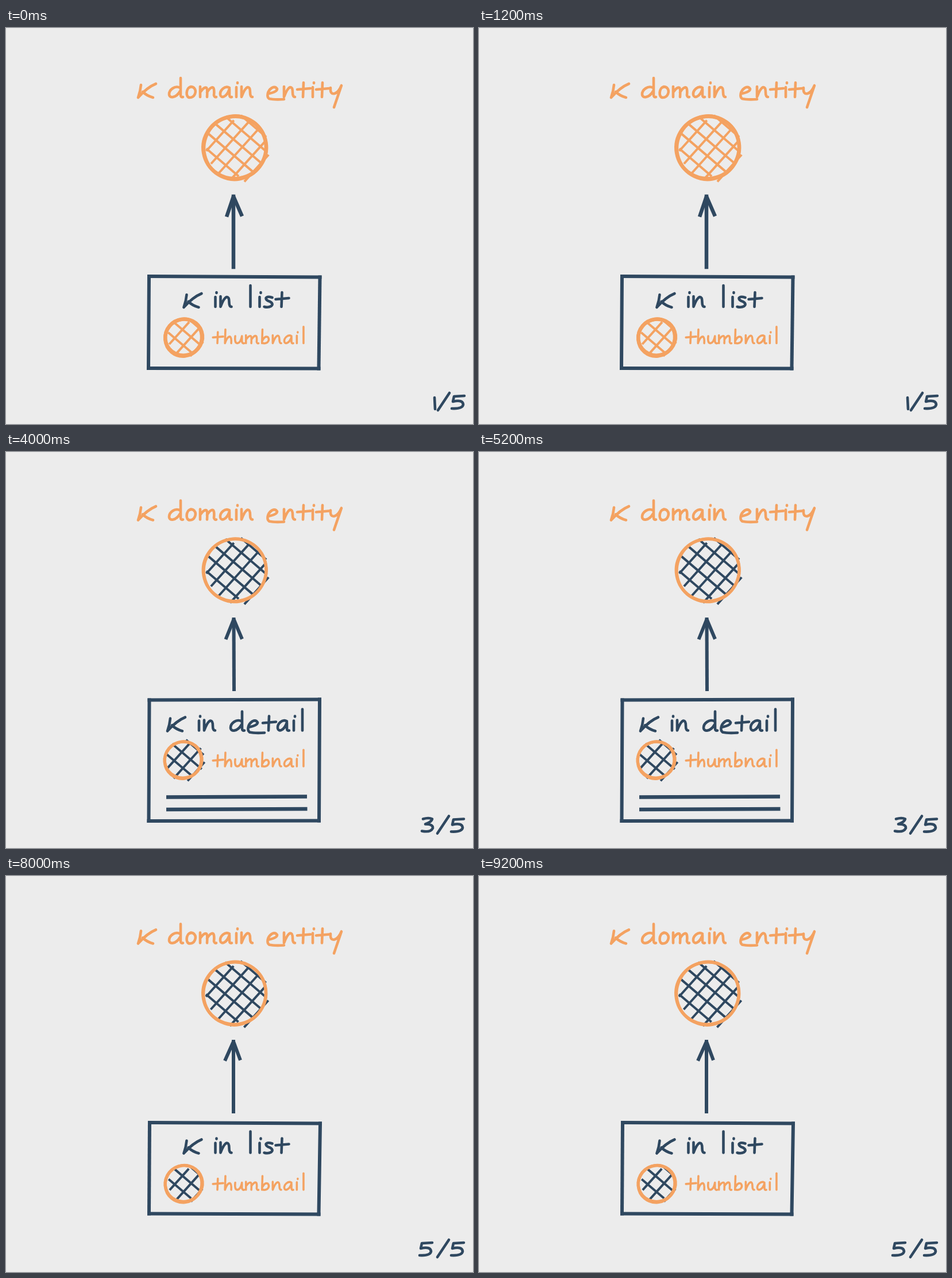
An HTML page with a canvas that plays this animation: 813 px wide and 689 px high, repeating every 10000 ms.

```html
<!DOCTYPE html>
<html lang="en">
<head>
<meta charset="utf-8">
<title>K domain entity</title>
<style>
html, body { margin: 0; width: 100%; height: 100%; overflow: hidden; background: #ececec; }
canvas { display: block; }
</style>
</head>
<body>
<canvas id="stage" width="813" height="689" role="img"></canvas>
<script>
const stage = document.getElementById('stage');
const ctx = stage.getContext('2d');
const ORANGE = '#f4a261', NAVY = '#2f4860', PAPER = '#ececec';
const SMALL = 0.777;

// Handwritten letters: [advance, pen strokes], baseline at y = 0
const glyphs = {
  ' ': [20, ''],
  K: [36, 'M9-21Q8-10 4 1M35-23Q20-17 4 1M12-9Q19-2 30 1'],
  a: [27, 'M18-16C10-21 1-11 2-4C3 3 13 1 18-14L18-4Q18 1 22 0'],
  b: [25, 'M4-31L3 0M4-6Q9-17 16-14Q21-8 15-2Q9 2 3-1'],
  c: [27, 'M18-16Q9-19 4-10Q1 1 9 1Q15 0 20-4'],
  d: [31, 'M21-16C12-21 2-12 2-5C2 3 14 2 21-10M22-33L22-4Q22 1 26 0'],
  e: [28, 'M4-6Q18-9 18-14Q15-19 9-16C0-10 0 0 4 3Q12 5 30 4'],
  g: [28, 'M18-15C8-20 1-8 4-3Q10 2 18-14L16 6Q13 18 4 14'],
  h: [24, 'M4-31L3 0Q8-15 14-15Q18-13 17 0'],
  i: [10, 'M3-17L3 0M5-25L5-24'],
  k: [34, 'M5-31L3 0M34-23Q18-15 6-8Q18-4 29 0'],
  l: [21, 'M8-37L8 0'],
  m: [35, 'M2-18L2 0M2-8Q9-18 13-16Q15-14 14 0M14-8Q21-19 25-16Q27-13 26-3Q27 1 30 0'],
  n: [26, 'M2-18L2 0Q8-16 13-17Q17-17 17-8Q17 0 21 0'],
  o: [23, 'M9-18C0-16-1 1 7 1C16 1 19-10 15-15Q12-19 7-17'],
  p: [20, 'M4-15L2 14M4-10Q10-19 15-14Q19-5 10-1Q6 0 3-3'],
  s: [22, 'M15-16Q6-19 4-15Q4-11 11-9Q18-5 13-1Q8 2 1 0'],
  t: [23, 'M10-25L9 0M-1-13L22-15'],
  u: [24, 'M2-16Q0 0 7 0Q14-1 17-16L17-4Q18 1 22 0'],
  y: [23, 'M1-16Q0-4 8-6Q15-8 20-20L7 18'],
  1: [8, 'M3-19L4 1'],
  2: [29, 'M4-17Q7-24 14-22Q17-17 11-10Q5-1 2-3Q3-9 10-3Q15 1 26 1'],
  3: [28, 'M4-22Q14-25 20-22Q19-17 8-13Q22-13 21-6Q17 2 2-1'],
  4: [24, 'M10-21L2-7Q12-6 20-8M18-20L14 1'],
  5: [31, 'M23-22L5-21L3-12Q20-16 21-7Q20 1 1 0'],
  '/': [24, 'M21-27L1 3']
};
for (const g of Object.values(glyphs)) g[1] = new Path2D(g[1]);

function write(text, x, y, color, size = 1, angle = 0) {
  ctx.save();
  ctx.translate(x, y);
  ctx.rotate(angle);
  ctx.scale(size, size);
  ctx.strokeStyle = color;
  ctx.lineWidth = 4.6;
  ctx.lineCap = ctx.lineJoin = 'round';
  for (const ch of text) {
    const [advance, path] = glyphs[ch];
    ctx.stroke(path);
    ctx.translate(advance, 0);
  }
  ctx.restore();
}

function line(x1, y1, x2, y2, color, width, cap = 'butt') {
  ctx.strokeStyle = color;
  ctx.lineWidth = width;
  ctx.lineCap = cap;
  ctx.beginPath();
  ctx.moveTo(x1, y1);
  ctx.lineTo(x2, y2);
  ctx.stroke();
}

let seed;
function jitter(amount) {
  seed = (seed * 16807) % 2147483647;
  return (seed / 2147483647 * 2 - 1) * amount;
}

function hatch(x, y, radius, angle, offsets, lean, color) {
  const c = Math.cos(angle), s = Math.sin(angle);
  for (const d of offsets) {
    const half = Math.sqrt(Math.max(0, (radius + d * lean) ** 2 - d * d));
    const a = -half + jitter(2), b = half + jitter(2);
    const px = x - s * d, py = y + c * d;
    line(px + c * a, py + s * a, px + c * b, py + s * b, color, 4);
  }
}

function disc(x, y, r, inner, rising, falling, color, width) {
  const deg = Math.PI / 180;
  hatch(x, y, inner, -48 * deg, rising, 0.14, color);
  hatch(x, y, inner, 40.5 * deg, falling, -0.09, color);
  ctx.strokeStyle = ORANGE;
  ctx.lineWidth = width;
  for (let pass = 0; pass < 2; pass++) {
    ctx.beginPath();
    ctx.ellipse(x + jitter(0.6), y + jitter(0.6), r + 0.5, r - 0.5, jitter(1.5), 0, 7);
    ctx.stroke();
  }
}

function arrow(x1, y1, x2, y2, wings, color, width) {
  line(x1, y1, x2, y2, color, width, 'square');
  ctx.lineJoin = 'round';
  ctx.lineCap = 'butt';
  ctx.beginPath();
  ctx.moveTo(wings[0], wings[1]);
  ctx.lineTo(x2, y2);
  ctx.lineTo(wings[2], wings[3]);
  ctx.stroke();
}

function box(p) {
  for (let i = 0; i < 8; i += 2)
    line(p[i], p[i + 1], p[(i + 2) % 8], p[(i + 3) % 8], NAVY, 6, 'square');
}

function tap() {
  write('tap', 557, 410, ORANGE, 0.75, -0.49);
  line(594.5, 333, 592, 360, ORANGE, 6);
  line(618, 341, 609.5, 358, ORANGE, 6);
  line(638.5, 360.5, 616, 368.5, ORANGE, 6);
}

function rules(y1, y2, y3, y4) {
  line(279, y1, 524, y2, NAVY, 6.7);
  line(279, y3, 524.5, y4, NAVY, 6.3);
}

function goBack() {
  arrow(272, 333.5, 190, 332.5, [226, 320, 225, 345.5], ORANGE, 6);
  write('go back', 164, 387.5, ORANGE, SMALL);
}

const steps = [
  { x: 226, y: 120, ring: [398, 208.5], ringW: 6.3, fill: ORANGE, inner: 31, thumb: [309.5, 538.5],
    shaft: [396, 416, 396, 293], wings: [384, 328.5, 411, 327.5], shaftW: 6.5,
    frame: [249, 432, 546.5, 433.5, 544.5, 592.5, 248, 592], label: 'K in list', labelX: 305.5, labelY: 485,
    noteY: 548.5, page: [743, 662] },
  { x: 227, y: 117, ring: [398, 206], ringW: 5.8, fill: ORANGE, inner: 30, thumb: [310, 536.5],
    shaft: [398, 411, 398, 289], wings: [386, 323.5, 413, 322.5], shaftW: 7.2,
    frame: [251, 430, 547, 429.5, 546.5, 589.5, 251, 588.5], label: 'K in list', labelX: 306.5, labelY: 483,
    noteY: 546.5, page: [721, 660], extra: tap },
  { x: 226, y: 117.5, ring: [398, 206], ringW: 5.2, fill: NAVY, inner: 34, thumb: [308.5, 536],
    shaft: [397, 413, 396.5, 291], wings: [382.5, 326, 411, 325.5], shaftW: 6,
    frame: [249.5, 431.5, 546, 430.5, 545, 641.5, 248.5, 642], label: 'K in detail', labelX: 277, labelY: 484.5,
    noteY: 547, page: [722, 660.5], extra: () => rules(600.5, 599.5, 622, 621) },
  { x: 227, y: 116.5, ring: [398.5, 205], ringW: 5.2, fill: NAVY, inner: 30, thumb: [310, 535.5],
    shaft: [398, 411, 398, 289], wings: [384, 324, 411, 324], shaftW: 6.5,
    frame: [251, 429, 547, 430, 546, 640, 251, 639.5], label: 'K in detail', labelX: 277.5, labelY: 483.5,
    noteY: 546.5, page: [726, 660],
    extra: () => { rules(598, 600, 620.5, 620.5); goBack(); } },
  { x: 226, y: 116.5, ring: [397.5, 204.5], ringW: 5.3, fill: NAVY, inner: 30, thumb: [309.5, 535.5],
    shaft: [396, 410, 396, 288], wings: [381, 321.5, 408, 320.5], shaftW: 6,
    frame: [250, 429, 547, 430.5, 544.5, 588.5, 249, 587.5], label: 'K in list', labelX: 305.5, labelY: 481.5,
    noteY: 546, page: [719, 660] }
];

function draw(n) {
  const s = steps[n];
  seed = n % 2 ? 4271 : 9133;
  ctx.fillStyle = PAPER;
  ctx.fillRect(0, 0, 813, 689);
  write('K domain entity', s.x, s.y, ORANGE);
  disc(...s.ring, 54.5, 53, [-33, -12, 9, 32, 52], [-50, -31, -10, 11, 33], s.fill, s.ringW);
  arrow(...s.shaft, s.wings, NAVY, s.shaftW);
  box(s.frame);
  write(s.label, s.labelX, s.labelY, NAVY);
  disc(...s.thumb, 32, s.inner, [-11, 9, 30], [-30, -9, 11], s.fill, s.ringW);
  write('thumbnail', s.x + 135, s.noteY, ORANGE, SMALL);
  if (s.extra) s.extra();
  const page = `${n + 1}/5`;
  write(page, ...s.page, NAVY);
  stage.setAttribute('aria-label', `K domain entity, ${s.label}, thumbnail, ${page}`);
}

const start = performance.now();
let shown = -1;
function tick() {
  const n = Math.floor((performance.now() - start) / 2000) % 5;
  if (n !== shown) draw(shown = n);
  requestAnimationFrame(tick);
}
tick();
</script>
</body>
</html>
```
